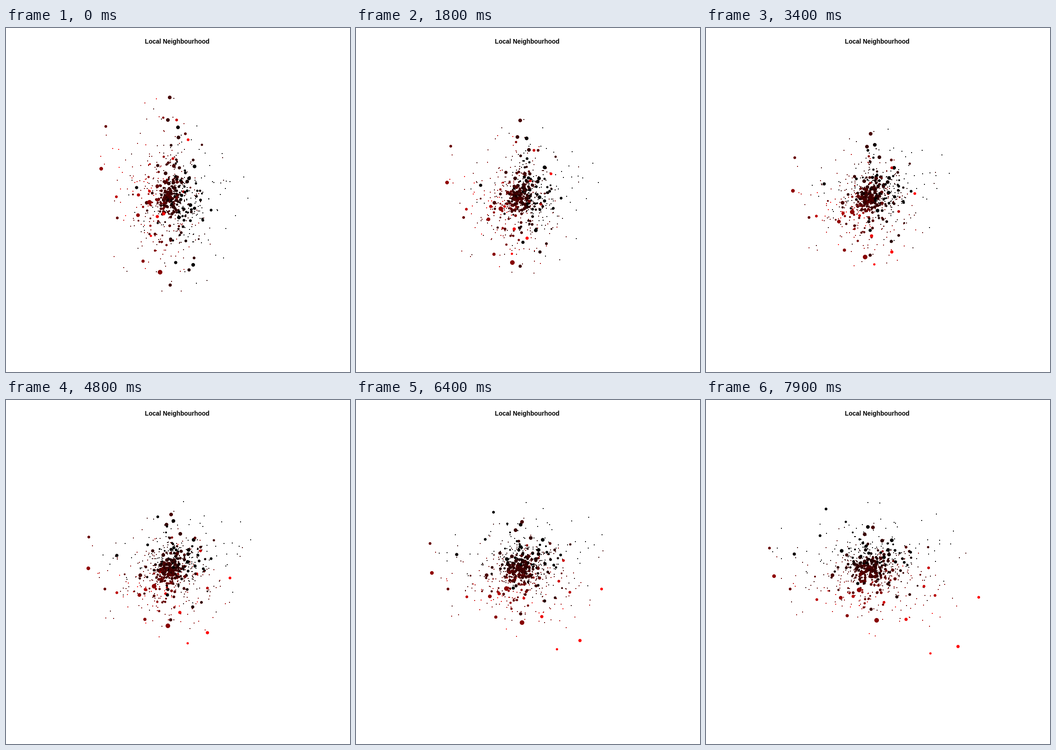
These frames come from a looping animation (748 px wide and 748 px high, 8000 ms). A matplotlib script:

```python
import matplotlib.pyplot as plt
import numpy as np
from matplotlib.animation import FuncAnimation

SIZE, DPI = 748, 64
FRAMES, STEP = 80, 100
LAST = FRAMES - 1
CX, CY = 361, 365
X_END, Y_END = 0.558, 2.24    # scale divisors reached on the last frame
SHEAR = 0.355                 # horizontal share of the depth drift

# The most visible stars: x, y at the start, y at the end, diameter
KEY_STARS = np.array([
    (335, 531, 479, 10), (356, 151, 277, 8), (375, 238, 306, 8),
    (217, 214, 322, 6), (343, 404, 536, 7), (315, 452, 551, 5),
    (396, 243, 429, 6), (371, 200, 365, 6), (357, 559, 455, 7),
    (398, 526, 428, 7), (242, 413, 411, 6), (240, 367, 434, 6),
    (284, 347, 335, 7), (312, 379, 413, 10)], float)

rng = np.random.default_rng(11)


def key_stars():
    """Offsets from the centre and depth drift per frame."""
    x, y = KEY_STARS[:, 0] - CX, KEY_STARS[:, 1] - CY
    drift = ((KEY_STARS[:, 2] - CY) * Y_END - y) / LAST
    return np.array([x, y, drift])


def cloud(n, sx, sy, slope, noise):
    """Random ellipsoid with soft tails, tilted in depth along x."""
    g = rng.normal(size=(3, n)) * (0.35 + rng.gamma(2, 0.32, n))
    x, y = g[0] * sx, g[1] * sy
    drift = slope * x + noise * g[2]
    x_end = (x + SHEAR * drift * LAST) / X_END
    y_end = (y + drift * LAST) / Y_END
    start = np.hypot(x / 195, y / 230) < 1
    end = np.hypot(x_end / 235, y_end / 185) < 1
    return np.array([x, y, drift])[:, start & end]


def place(stars, i):
    x, y, drift = stars
    u = i / LAST
    px = CX + (x + SHEAR * drift * i) / (1 + (X_END - 1) * u)
    py = CY + (y + drift * i) / (1 + (Y_END - 1) * u)
    return np.column_stack([px, py])


def shade(stars):
    red = np.clip((55 + 70 * stars[2]) / 255, 0, 1)
    return np.column_stack([red, 0 * red, 0 * red])


def area(d):
    return (np.asarray(d) * 72 / DPI) ** 2


balls_xyz = np.hstack([cloud(45, 60, 85, -0.012, 0.95),
                       cloud(100, 30, 42, -0.018, 0.45),
                       cloud(100, 16, 32, -0.016, 0.25)])
widths = rng.choice([4, 5, 6, 7, 8], balls_xyz.shape[1],
                    p=[.15, .3, .3, .15, .1])
balls_xyz = np.hstack([balls_xyz, key_stars()])
widths = np.append(widths, KEY_STARS[:, 3])
dots_xyz = np.hstack([cloud(390, 48, 72, -0.012, 0.8),
                      cloud(110, 90, 105, -0.011, 1.5)])

fig = plt.figure(figsize=(SIZE / DPI, SIZE / DPI), dpi=DPI, facecolor="white")
ax = fig.add_axes([0, 0, 1, 1])
ax.set_xlim(0, SIZE)
ax.set_ylim(SIZE, 0)
ax.axis("off")
ax.text(372.5, 34, "Local Neighbourhood", ha="center", va="baseline",
        family="Liberation Sans", weight="bold", color="black",
        size=13.65 * 72 / DPI)


def scatter(stars, d, marker, smooth):
    return ax.scatter(*place(stars, 0).T, s=area(d), c=shade(stars),
                      marker=marker, linewidths=0, antialiased=smooth)


dots = scatter(dots_xyz, 2, "s", False)
balls = scatter(balls_xyz, widths, "o", True)


def update(i):
    dots.set_offsets(np.round(place(dots_xyz, i)))
    balls.set_offsets(np.round(place(balls_xyz, i)))
    return dots, balls


anim = FuncAnimation(fig, update, frames=FRAMES, interval=STEP,
                     repeat=True, repeat_delay=0, blit=False)
plt.show()
```
